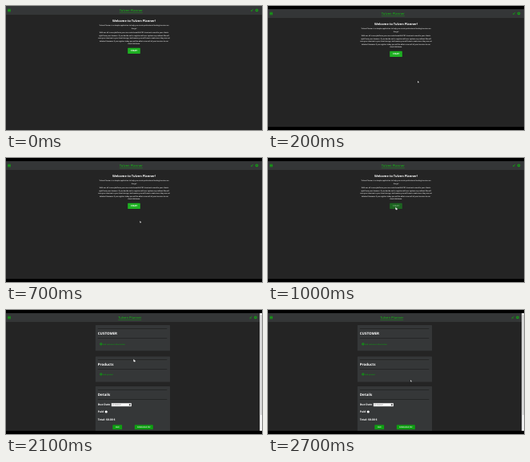
Write an HTML page that moves like this. It is 320x156 px and loops after 2800 ms.

```html
<!DOCTYPE html>
<html lang="en">
<head>
<meta charset="utf-8">
<title>Invoice app walkthrough</title>
<style>
html, body { margin: 0; width: 100%; height: 100%; overflow: hidden; background: #000; }
svg { display: block; width: 100%; height: 100%; }
text { font-family: "Open Sans", "Noto Sans", sans-serif; fill: #fff; text-rendering: geometricPrecision; }
.mid { text-anchor: middle; }
.bold { font-weight: 700; }
.brand { font-size: 4.05px; font-weight: 600; fill: #18a818; text-decoration: underline; }
.body { font-size: 2.04px; font-weight: 600; }
.add { font-size: 2.2px; font-weight: 600; fill: #0fa012; }
.btn { font-size: 2px; font-weight: 700; }
</style>
</head>
<body>
<svg viewBox="0 0 320 156" preserveAspectRatio="none">
  <rect width="320" height="156" fill="#242424"/>
  <g id="page">
    <rect y="4" width="320" height="11" fill="#343637"/>
    <path d="M2.1 8.2h3.8M2.1 9.5h3.8M2.1 10.8h3.8" stroke="#14a014" stroke-width=".95"/>
    <g id="nav">
      <text class="mid brand" x="156.3" y="11.1">Tulven Planner</text>
      <g fill="none" stroke="#14a014" stroke-width=".8">
        <path d="M306.2 10.8l2.9-2.8M306.4 9.1l1.5 1.5"/>
        <circle cx="313.5" cy="9.3" r="1.3" stroke-width="1.2"/>
      </g>
    </g>
    <g id="home">
      <text class="mid bold" x="160" y="23.5" font-size="3.9">Welcome to Tulven Planner!</text>
      <g id="intro"></g>
      <rect id="start" x="152.2" y="56.7" width="15.6" height="7.4" rx=".7"/>
      <text id="startText" class="mid bold" x="160" y="61.3" font-size="2.7">START</text>
    </g>
    <g id="form"></g>
  </g>
  <g id="bars"><rect width="320" height="4"/><rect y="152" width="320" height="4"/></g>
  <g id="cursor">
    <path id="arrow" d="M0 0V2.7L.65 2.15 1.1 3.1 1.6 2.85 1.15 1.95H2Z" fill="#fff" stroke="#111" stroke-width=".2"/>
    <path id="hand" d="M.5 0Q1 0 1 .5V1.3L2.3 1.6Q2.6 1.8 2.5 2.4L2.1 3.4H.6L-.4 2 0 1.7V.5Q0 0 .5 0Z" fill="#fff" stroke="#111" stroke-width=".2"/>
  </g>
</svg>
<script>
const $ = id => document.getElementById(id);
const LOOP = 2800, STEP = 100;

const intro = [
  [29.2, "Tulven Planner is a simple application to help you create professional looking invoices on"],
  [32.8, "the go!"],
  [38.4, "With our all in one platform you can create beautiful PDF invoices to send to your clients"],
  [41.8, "right from your browser. If you decide not to register with our system no problem! We will"],
  [45.2, "save your invoices to your local storage, but beware you will have to make sure they are not"],
  [48.6, "deleted. However if you register today you will be able to save all of your invoices to our"],
  [52, "cloud database."]
];
$("intro").innerHTML = intro.map(([y, s]) => `<text class="mid body" x="160" y="${y}">${s}</text>`).join("");

const CARD = "#353738", LINE = "#141414";
const rect = (x, y, w, h, fill, r = 0) =>
  `<rect x="${x}" y="${y}" width="${w}" height="${h}" rx="${r}" fill="${fill}"/>`;
const label = (x, y, size, s) =>
  `<text class="bold" x="${x}" y="${y}" font-size="${size}">${s}</text>`;
const card = (y, h, title) =>
  rect(111.8, y, 93.2, h, CARD, .5) +
  rect(114.8, y + 4, 86.5, .5, LINE) +
  label(114.8, y + 11.5, 4.45, title) +
  rect(114.8, y + 16, 86.5, .5, LINE);
const addLink = (y, s) =>
  `<circle cx="118.8" cy="${y}" r="1.6" fill="#0fa012"/>` +
  `<path d="M118 ${y}h1.6M118.8 ${y - .8}v1.6" stroke="${CARD}" stroke-width=".4"/>` +
  `<text class="add" x="121" y="${y + .8}">${s}</text>`;
const button = (x, w, s) =>
  rect(x, 144.4, w, 5.8, "#0f9f12", .5) +
  `<text class="mid btn" x="${x + w / 2}" y="148">${s}</text>`;

$("form").innerHTML =
  card(19, 32.3, "CUSTOMER") + addLink(42.8, "Add customer information") +
  card(58.5, 32, "Products") + addLink(80.8, "Add product") +
  card(96, 56, "Details") +
  label(114.8, 120.3, 3.35, "Due Date") +
  rect(131.8, 117.3, 25, 4, "#fff", .2) +
  `<text x="132.8" y="120.1" font-size="2.1" style="fill:#222">01/10/2021</text>` +
  rect(153.9, 118.4, 1.7, 1.8, "#333") +
  label(114.8, 129.2, 3.35, "Paid") +
  `<circle cx="125.2" cy="128" r="1.6" fill="#fff"/>` +
  label(114.8, 138.5, 3.4, "Total: $0.00 $") +
  button(133.3, 11.8, "SAVE") + button(160.8, 23, "DOWNLOAD PDF") +
  rect(317.2, 4, 2.8, 148, "#f4f4f4") + rect(317.5, 6, 2.2, 126, "#d2d2d2");

// time, x, y of the pointer tip
const path = [
  [100, 191.3, 91.8], [200, 187, 94], [300, 181.5, 94.6], [400, 176.4, 93.6],
  [600, 171.3, 87], [800, 163.3, 71], [900, 160.6, 65], [1000, 159.3, 61.8],
  [2300, 159.3, 61.8], [2500, 167, 72], [2700, 178, 87.7]
];
function pointer(t) {
  const i = path.findIndex(p => p[0] >= t);
  if (i < 0) return path[path.length - 1].slice(1);
  if (i === 0) return path[0].slice(1);
  const [t0, x0, y0] = path[i - 1], [t1, x1, y1] = path[i];
  const k = (t - t0) / (t1 - t0);
  return [x0 + (x1 - x0) * k, y0 + (y1 - y0) * k];
}

const show = (id, on) => $(id).setAttribute("display", on ? "inline" : "none");

function draw(ms) {
  const t = Math.floor((ms % LOOP) / STEP) * STEP;
  const framed = t >= 100, form = t >= 2100;
  const hover = t >= 900 && t < 2400, pressed = t >= 2000;
  show("bars", framed);
  show("cursor", framed);
  show("home", !form);
  show("form", form);
  show("hand", hover);
  show("arrow", !hover);
  $("page").setAttribute("transform", `translate(0 ${framed ? 0 : -4})`);
  $("nav").setAttribute("transform", `translate(${form ? -1.6 : 0} 0)`);
  $("start").setAttribute("fill", pressed ? "#214f23" : hover ? "#1d6421" : "#1eb022");
  $("startText").style.fill = hover ? "#78a67a" : "#fff";
  $("cursor").setAttribute("transform", `translate(${pointer(t).join(" ")})`);
}

let begin;
function tick(now) {
  begin ??= now;
  draw(now - begin);
  requestAnimationFrame(tick);
}
draw(0);
requestAnimationFrame(tick);
</script>
</body>
</html>
```
